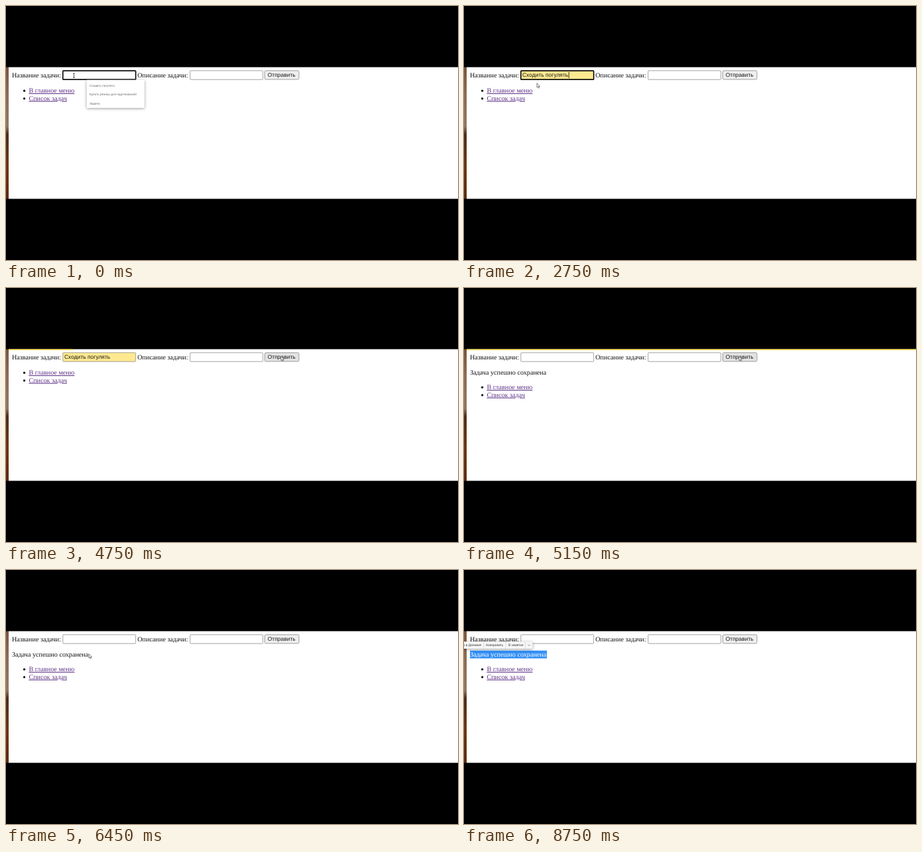
An HTML page that plays this animation: 682 px wide and 384 px high, repeating every 9950 ms.

```html
<!DOCTYPE html>
<html lang="ru">
<head>
<meta charset="utf-8">
<title>Форма задачи</title>
<style>
  html, body { margin: 0; width: 100%; height: 100%; overflow: hidden; background: #000; }
  svg { display: block; width: 682px; height: 384px; }
  text { white-space: pre; text-rendering: geometricPrecision; }
  .serif { font: 10.16px "Liberation Serif", serif; fill: #111; }
  .sans { font: 8.46px "Liberation Sans", sans-serif; fill: #161616; }
  .tiny { font: 4.68px "Liberation Sans", sans-serif; fill: #666; }
  .menu { font: 4.85px "Liberation Sans", sans-serif; fill: #333; }
  .link { fill: #5f3388; text-decoration: underline; }
  .field { fill: #fff; stroke: #8c8c8c; stroke-width: .8; }
  .shadow { filter: drop-shadow(0 1px 2px rgba(0, 0, 0, .4)); }
</style>
</head>
<body>
<svg viewBox="0 0 682 384">
  <defs>
    <linearGradient id="wall" x2="0" y2="1">
      <stop offset="0" stop-color="#7a543c"/>
      <stop offset=".2" stop-color="#8a6a52"/>
      <stop offset=".45" stop-color="#927660"/>
      <stop offset=".51" stop-color="#4c2d19"/>
      <stop offset=".75" stop-color="#6a3613"/>
      <stop offset="1" stop-color="#5a2a0e"/>
    </linearGradient>
    <clipPath id="picked"><rect class="pick" x="9" y="121.8" width="116" height="11.8"/></clipPath>
  </defs>

  <rect width="682" height="384"/>
  <rect y="92.5" width="4" height="199" fill="url(#wall)"/>
  <rect x="4" y="92.5" width="678" height="199" fill="#fff"/>
  <rect id="bar" x="4" y="92.4" width="678" height="1.6" fill="#f2d94a"/>

  <text class="serif" x="9" y="107.5">Название задачи:</text>
  <rect id="name" class="field" x="85.8" y="97.8" width="109.9" height="13.4" rx="1"/>
  <text id="value" class="sans" x="88" y="107.3">Сходить погулять</text>
  <rect id="caret" y="99.8" width=".8" height="9.4"/>
  <text class="serif" x="198.2" y="107.5">Описание задачи:</text>
  <rect class="field" x="277.8" y="97.8" width="109.9" height="13.4" rx="1"/>
  <rect id="button" x="390.4" y="97.8" width="51.6" height="13.2" rx="1.6" stroke="#868686" stroke-width=".8"/>
  <text class="sans" x="394.8" y="107.3">Отправить</text>

  <g id="saved">
    <text class="serif" x="9" y="131">Задача успешно сохранена</text>
    <rect class="pick" x="9" y="121.8" width="116" height="11.8" fill="#338ff5"/>
    <text class="serif" x="9" y="131" style="fill:#fff" clip-path="url(#picked)">Задача успешно сохранена</text>
  </g>

  <g id="links">
    <circle cx="27.6" cy="128.2" r="1.6"/>
    <text class="serif link" x="34.4" y="131">В главное меню</text>
    <circle cx="27.6" cy="139.9" r="1.6"/>
    <text class="serif link" x="34.4" y="142.7">Список задач</text>
  </g>

  <g id="list">
    <rect class="shadow" x="121.7" y="111.7" width="87.2" height="42.4" fill="#fff"/>
    <rect id="hover" x="121.7" y="114" width="87.2" height="12.8" fill="#ebebeb"/>
    <text class="tiny" x="126" y="122.1">Сходить погулять</text>
    <text class="tiny" x="126" y="135.3">Купить резину для подтягиваний</text>
    <text class="tiny" x="126" y="148.5">Задача</text>
  </g>

  <g id="popup">
    <rect class="shadow" x="-8" y="108.2" width="111.5" height="10.8" rx="1.5" fill="#f6f6f6"/>
    <text class="menu" x="26.3" y="115.3" text-anchor="end">Найти это в Долмике</text>
    <text class="menu" x="33.2" y="115.3">Копировать</text>
    <text class="menu" x="67" y="115.3">В заметки</text>
    <path d="M29.7 108.5v10.2M63 108.5v10.2M92.3 108.5v10.2" stroke="#d2d2d2" stroke-width=".7"/>
    <path d="M96.2 112.7l1.9 1.9l1.9-1.9" fill="none" stroke="#666" stroke-width=".7"/>
  </g>

  <path id="arrow" d="M0 0V6.4L1.5 5.1L2.5 7.4L3.6 6.9L2.6 4.7H4.5Z" fill="#fff" stroke="#444" stroke-width=".7"/>
  <path id="beam" d="M-1.5-3.2H1.5M0-3.2V3.2M-1.5 3.2H1.5" fill="none" stroke="#333" stroke-width=".8"/>
</svg>
<script>
const LOOP = 9950, STEP = 50;

// time, x, y of the pointer
const path = [
  [0, 102.5, 105], [150, 112, 107], [550, 158, 118.5], [1400, 158, 118.5],
  [1600, 164, 119.7], [2100, 164, 119.7], [2200, 163, 119.7], [2300, 163, 119.7],
  [2750, 110, 116.7], [3000, 104, 117], [3850, 360.5, 121.7], [4300, 412, 105],
  [4400, 415, 103.3], [5150, 415, 103.3], [5700, 375, 112], [6450, 125, 126.7],
  [6750, 125, 127.5], [7700, 9, 127.5], [7850, -8, 127.5]
];

const $ = id => document.getElementById(id);
const picks = document.querySelectorAll(".pick");
const within = (t, a, b) => t >= a && t < b;
const clamp = (v, lo, hi) => Math.min(hi, Math.max(lo, v));
const show = (id, on) => { $(id).style.display = on ? "" : "none"; };
const move = (id, x, y) => $(id).setAttribute("transform", `translate(${x} ${y})`);
function set(el, attrs) {
  for (const key in attrs) el.setAttribute(key, attrs[key]);
}

function pointer(t) {
  const i = path.findIndex(p => p[0] > t);
  if (i < 0) return path[path.length - 1].slice(1);
  const [t0, x0, y0] = path[i - 1], [t1, x1, y1] = path[i];
  const k = (t - t0) / (t1 - t0);
  return [x0 + (x1 - x0) * k, y0 + (y1 - y0) * k];
}

function draw(t) {
  const [x, y] = pointer(t);
  const saved = t >= 4800, chosen = within(t, 1500, 4800);
  const focus = t < 4400;
  const listOpen = t < 1500;
  const over = listOpen && x > 121.7 && y > 111.7;

  // Form
  set($("name"), {
    style: `fill:${chosen || over ? "#ffe990" : "#fff"};` +
      (focus ? "stroke:#101010;stroke-width:1.7" : "")
  });
  show("value", chosen || over);
  $("value").style.fill = chosen ? "" : "#555";
  const blink = chosen ? (t - 1500) % 1000 < 500 : within(t, 450, 950);
  show("caret", focus && blink);
  set($("caret"), { x: chosen ? 157.8 : 88 });
  const onButton = x > 390 && x < 442 && y < 111;
  set($("button"), { fill: within(t, 4400, 4750) ? "#f5f5f5" : onButton ? "#e3e3e3" : "#efefef" });

  // Suggestions
  show("list", listOpen);
  show("hover", over);

  // Page after submitting
  show("saved", saved);
  move("links", 0, saved ? 22 : 0);
  set($("bar"), {
    width: 678 * clamp((t - 4700) / 350, 0, 1),
    opacity: within(t, 4750, 5700) ? clamp((5700 - t) / 300, 0, 1) : 0
  });

  // Selection dragged from right to left
  const left = t < 6750 ? 125 : clamp(x, 9, 125);
  for (const pick of picks) set(pick, { x: left, width: 125 - left });
  show("popup", t >= 8100);
  set($("popup"), { opacity: clamp((t - 8050) / 150, 0, 1) });

  // Pointer
  const text = t < 2000 && y < 111 || within(t, 6750, 7850);
  show("beam", text);
  show("arrow", !text && t < 7850);
  move("beam", x, y);
  move("arrow", x, y);
}

const start = performance.now();
function tick() {
  const t = Math.max(0, performance.now() - start) % LOOP;
  draw(Math.floor(t / STEP) * STEP);
  requestAnimationFrame(tick);
}
tick();
</script>
</body>
</html>
```
